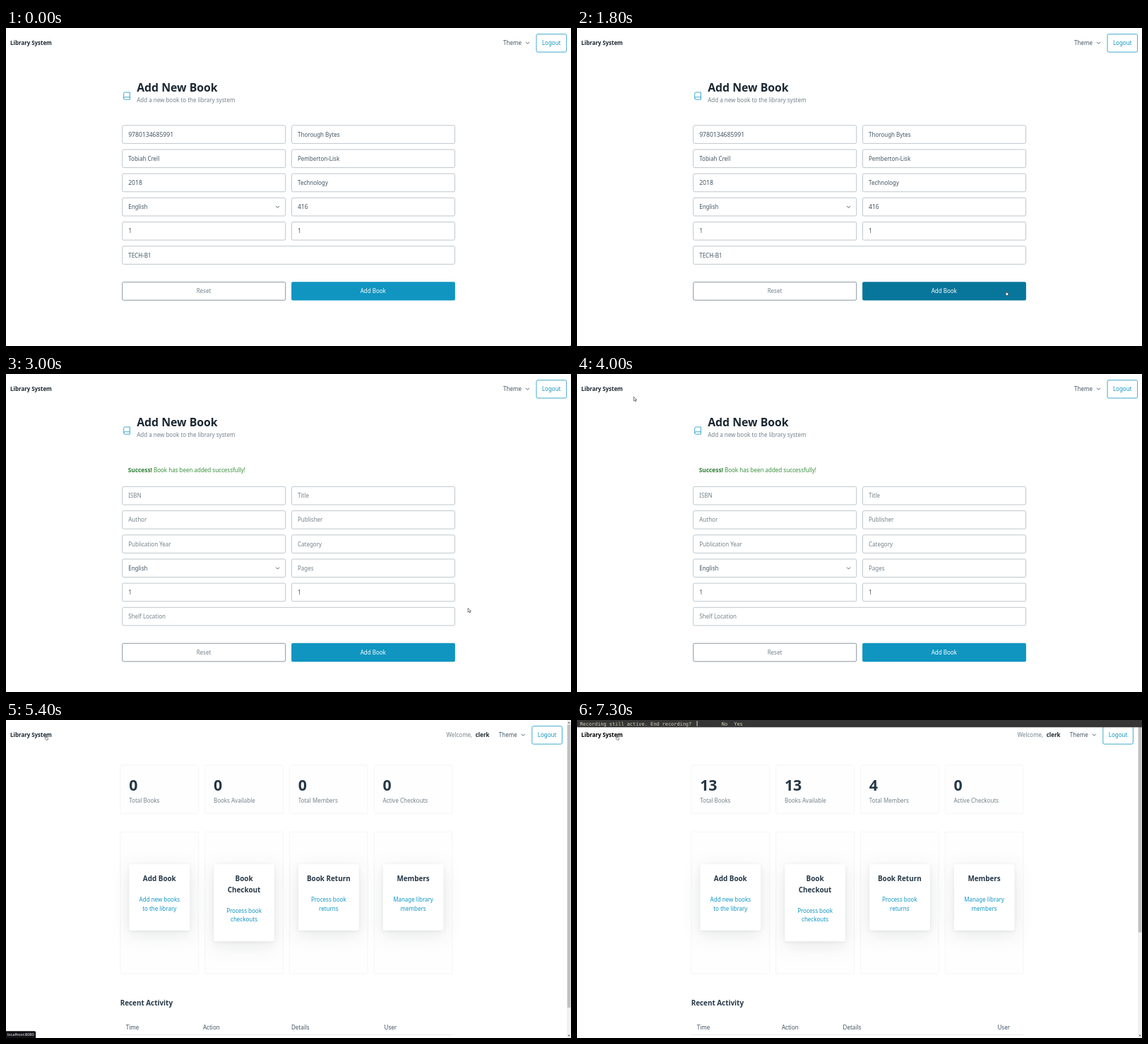
These frames come from a looping animation (800 by 450 pixels, 8000 ms). An HTML page:

```html
<!DOCTYPE html>
<html lang="en">
<head>
<meta charset="utf-8">
<title>Library System</title>
<style>
  html, body { margin: 0; width: 100%; height: 100%; overflow: hidden; background: #fff; }
  svg { display: block; width: 100vw; height: 100vh; }
  text { font: 8px "Noto Sans", "Open Sans", sans-serif; fill: #415462; white-space: pre; }
  .bold { font-weight: 700; fill: #1b2832; }
  .brand { font-size: 7.9px; }
  .title { font-size: 15.8px; }
  .heading { font-size: 9.9px; fill: #243746; }
  .count { font-size: 21.3px; fill: #243746; }
  .digits { font-size: 8.6px; }
  .muted { fill: #73828c; }
  .link { fill: #1095c1; }
  .mid { text-anchor: middle; }
  .white { fill: #fff; }
  .ok { fill: #388e3c; }
  .ok tspan { font-weight: 700; font-size: 8.3px; fill: #2a7d30; }
  .status { font-size: 5.6px; fill: #fff; }
  .mono { font: 6.92px "DejaVu Sans Mono", monospace; fill: #d6d2b8; }
  .line { fill: none; stroke: #1095c1; stroke-width: .8; }
  .field { fill: #fff; stroke: #a2afb9; stroke-width: .7; }
  .reset { fill: #fff; stroke: #596b78; stroke-width: .7; }
  .submit { fill: #1095c1; }
  .chevron { fill: none; stroke: #415462; stroke-width: .9; stroke-linecap: round; stroke-linejoin: round; }
  .panel { fill: #fefefe; stroke: #f1f3f4; stroke-width: .8; }
  .card { fill: #fff; filter: drop-shadow(0 1px 2px rgba(27,40,50,.07)) drop-shadow(0 6px 13px rgba(27,40,50,.1)); }
  .pointer { fill: #fff; stroke: #333; stroke-width: .65; stroke-linejoin: round; }
</style>
</head>
<body>
<svg id="stage" viewBox="0 0 800 450" preserveAspectRatio="none"></svg>
<script>
const LOOP = 8000;
const css = [];

// Declares a stepped animation from a {time: value} map and returns its style attribute.
function track(name, prop, steps) {
  const frames = Object.entries(steps).map(([ms, v]) => `${ms / LOOP * 100}%{${prop}:${v}}`);
  const last = Object.values(steps).pop();
  css.push(`@keyframes ${name}{${frames.join('')}100%{${prop}:${last}}}`);
  return `style="animation:${name} ${LOOP}ms step-end infinite"`;
}

// Shows the content only during the given [start, end] spans.
function during(name, spans, content) {
  const steps = { 0: 0 };
  for (const [start, end] of spans) {
    steps[start] = 1;
    if (end < LOOP) steps[end] = 0;
  }
  return `<g ${track(name, 'opacity', steps)}>${content}</g>`;
}

const text = (x, y, s, cls = '') => `<text x="${x}" y="${y}" class="${cls}">${s}</text>`;
const rect = (x, y, w, h, cls, r = 2, extra = '') =>
  `<rect x="${x}" y="${y}" width="${w}" height="${h}" rx="${r}" class="${cls}" ${extra}/>`;
const path = (d, cls, extra = '') => `<path d="${d}" class="${cls}" ${extra}/>`;
const chevron = (x, y) => path(`M${x - 2.2} ${y - 1.1}l2.2 2.2 2.2-2.2`, 'chevron');

const LEFT = 164.7, RIGHT = 404.5, FIELD_W = 231, FIELD_H = 25.6, ROW = 34.18;

function field(x, y, w, label, cls) {
  const type = /^\d+$/.test(label) ? cls + ' digits' : cls;
  return rect(x, y, w, FIELD_H, 'field') + text(x + 8.5, y + 15.9, label, type);
}

function formPage(titleY, top, labels, empty, buttonStyle) {
  const fields = labels.map((label, i) => {
    const y = top + Math.floor(i / 2) * ROW;
    const x = i % 2 ? RIGHT : LEFT;
    const w = i === labels.length - 1 ? 470.8 : FIELD_W;
    const muted = empty && !['English', '1'].includes(label);
    return field(x, y, w, label, muted ? 'muted' : '');
  });
  const buttonY = top + 221.8;
  const icon = `M168.4 ${titleY + .7}h7v10.2h-7a1.7 1.7 0 0 1-1.7-1.7v-6.8a1.7 1.7 0 0 1 1.7-1.7z
    M166.7 ${titleY + 9.2}a1.7 1.7 0 0 1 1.7-1.7h7`;
  return path(icon, 'line', 'stroke-width="1.1" stroke-linejoin="round"')
    + text(185.2, titleY - .3, 'Add New Book', 'bold title')
    + text(185.2, titleY + 14.6, 'Add a new book to the library system', 'muted')
    + fields.join('') + chevron(384.6, top + 3 * ROW + 13)
    + rect(LEFT, buttonY, FIELD_W, FIELD_H, 'reset')
    + text(280, buttonY + 15.6, 'Reset', 'mid muted')
    + rect(RIGHT - .4, buttonY - .4, FIELD_W + .8, FIELD_H + .8, 'submit', 2, buttonStyle)
    + text(519.8, buttonY + 15.6, 'Add Book', 'mid white');
}

const nav = dx => text(704 + dx, 24, 'Theme') + chevron(738.5 + dx, 21.2)
  + rect(751 + dx, 8.7, 42.6, 25.4, 'line') + text(772.2 + dx, 24, 'Logout', 'mid link');

const columnX = i => 161.9 + i * 119.75;

function dashboard() {
  const stats = ['Total Books', 'Books Available', 'Total Members', 'Active Checkouts'];
  const cards = [
    [['Add Book'], ['Add new books', 'to the library']],
    [['Book', 'Checkout'], ['Process book', 'checkouts']],
    [['Book Return'], ['Process book', 'returns']],
    [['Members'], ['Manage library', 'members']],
  ];
  const counts = values => values.map((v, i) => text(columnX(i) + 12.3, 99.7, v, 'bold count')).join('');
  const heads = xs => ['Time', 'Action', 'Details', 'User'].map((s, i) => text(xs[i], 437.6, s)).join('');
  const scroll = bottom => rect(794.8, 6.5, 4.6, bottom - 6.5, '', 0, 'fill="#c1c1c1"');

  const panels = stats.map((label, i) =>
    rect(columnX(i), 63.8, 110.8, 68.6, 'panel') + rect(columnX(i), 158.3, 110.8, 201, 'panel')
    + text(columnX(i) + 12.3, 116.8, label, 'muted'));

  const boxes = cards.map(([head, body], i) => {
    const x = columnX(i) + 12.6, centre = columnX(i) + 55.4;
    const shift = (head.length - 1) * 15.5;
    return rect(x, 204.3, 85.8, 93.5 + shift, 'card')
      + head.map((s, n) => text(centre, 228.2 + n * 15.5, s, 'mid bold heading')).join('')
      + body.map((s, n) => text(centre, 257 + shift + n * 12.6, s, 'mid link')).join('');
  });

  return text(623.6, 24, 'Welcome,', 'muted') + text(664.8, 24, 'clerk', 'bold brand') + nav(-6.2)
    + panels.join('') + boxes.join('')
    + text(161.7, 404.4, 'Recent Activity', 'bold heading')
    + path('M161.7 445.5h470.8', '', 'stroke="#e4e8eb" stroke-width=".8"')
    + rect(794, 0, 6, 450, '', 0, 'fill="#f1f1f1"')
    + path('M795.4 4.4l1.7-2 1.7 2zM795.4 445.8l1.7 2 1.7-2z', '', 'fill="#505050"')
    + during('loading', [[5400, 6200]], counts([0, 0, 0, 0]) + heads([169.8, 279, 404, 535.6]) + scroll(407))
    + during('loaded', [[6200, LOOP]], counts([13, 13, 4, 0]) + heads([169.8, 290, 376.6, 595.5]) + scroll(300.5));
}

const filled = ['9780134685991', 'Thorough Bytes', 'Tobiah Crell', 'Pemberton-Lisk', '2018',
  'Technology', 'English', '416', '1', '1', 'TECH-B1'];
const placeholders = ['ISBN', 'Title', 'Author', 'Publisher', 'Publication Year',
  'Category', 'English', 'Pages', '1', '1', 'Shelf Location'];

const hover = track('hover', 'fill', { 0: '#1095c1', 1300: '#0f8fb9', 1400: '#0d85ad', 1500: '#08769b' });
const release = track('release', 'fill', { 0: '#08769b', 1900: '#0880a6', 2000: '#1095c1' });

const at = (x, y) => `translate(${x}px,${y}px)`;
const pointerPath = track('pointer', 'transform', {
  0: at(799, 449), 400: at(775, 449), 500: at(746, 449), 600: at(719.5, 449),
  800: at(697, 425), 900: at(663, 390), 1000: at(635.6, 370.6),
  1300: at(618, 373), 1400: at(606, 372), 1900: at(605.8, 372.6),
  2700: at(612, 367), 2800: at(625, 356), 2900: at(641, 341), 3000: at(653.8, 331),
  3200: at(480, 214), 3300: at(309.6, 97.5), 3600: at(200, 66), 3700: at(96.5, 38.5),
  3900: at(88, 35), 4000: at(80, 32), 4100: at(73, 29), 4200: at(66, 26.5),
  4300: at(61, 24.5), 4400: at(57, 22.8), 4500: at(54.6, 21.8),
});
const arrow = path('M.3 .3v5.7l1.4-1.1 1 2.1 1.1-.5-1-2h1.7z', 'pointer');
const hand = path('M1.3 3.6V.9q.5-.7 1 0v1.7l2 .4q.6.2.5.9l-.4 2.5H2L.4 4.3q.2-.8.9-.3z', 'pointer');
const brandFill = track('brand', 'fill', { 0: '#1b2832', 4200: '#000', 5400: '#1b2832', 5800: '#000' });

document.getElementById('stage').innerHTML =
  during('form', [[0, 5400]], nav(0))
  + during('entry', [[0, 1900]], formPage(90.3, 137.8, filled, false, hover))
  + during('added', [[1900, 5400]],
      formPage(74.3, 159.4, placeholders, true, release)
      + text(172.8, 139.2, '<tspan>Success!</tspan> Book has been added successfully!', 'ok'))
  + during('home', [[5400, LOOP]], dashboard())
  + during('pressed', [[4500, 5400]], rect(2, 11, 67.2, 20.6, '', 2, 'fill="#e9ebec"'))
  + `<text x="6.1" y="24" class="bold brand" ${brandFill}>Library System</text>`
  + during('address', [[4300, 6200]],
      path('M0 440.2h40.2q2 0 2 2V450H0z', '', 'fill="#111116"') + text(1.8, 447.2, 'localhost:8080', 'status'))
  + `<g ${pointerPath}>`
  + during('arrow', [[0, 1300], [1900, 4200]], arrow)
  + during('hand', [[1300, 1900], [4200, LOOP]], hand) + '</g>'
  + during('prompt', [[7300, LOOP]],
      rect(0, 0, 800, 10.3, '', 0, 'fill="#363636"')
      + text(4.2, 7.6, 'Recording still active. End recording?', 'mono')
      + rect(169.6, 1.4, .9, 7.4, '', 0, 'fill="#eee"')
      + text(204.8, 7.6, 'No', 'mono') + text(222.3, 7.6, 'Yes', 'mono'));

document.head.insertAdjacentHTML('beforeend', `<style>${css.join('\n')}</style>`);
</script>
</body>
</html>
```
